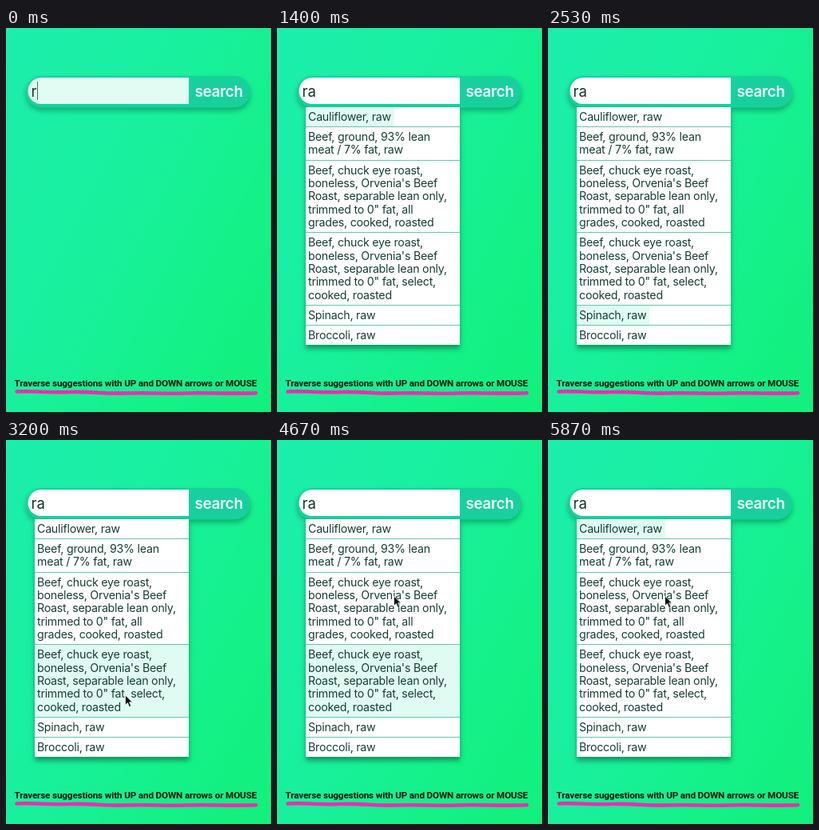
These frames come from a looping animation (332 px wide and 480 px high, 5940 ms). An HTML page:

```html
<!DOCTYPE html>
<html lang="en">
<head>
<meta charset="utf-8">
<title>Search suggestions</title>
<style>
  html, body { margin: 0; width: 100%; height: 100%; overflow: hidden; }
  #stage {
    position: relative; width: 332px; height: 480px; overflow: hidden;
    background: linear-gradient(117deg, #1ceead 0%, #18f09c 45%, #14f187 75%, #12f07c 100%);
    font-family: Inter, "Liberation Sans", sans-serif;
  }
  svg { position: absolute; left: 0; top: 0; }
  #list {
    position: absolute; left: 35.5px; top: 98.6px; width: 193.5px;
    background: #fff; color: #153f36;
    font-size: 14.2px; line-height: 16.35px; letter-spacing: -.23px;
    box-shadow: 0 5px 6px rgba(0, 85, 55, .55);
  }
  .item { border-bottom: 1px solid #62c9ab; white-space: pre; }
  .item:last-child { border-bottom: 0; margin-bottom: -1px; }
  .item span { display: block; padding: 4px 4px 4px 3.5px; }
  .item .short { width: fit-content; }
  .item .on { background: #e0fbf2; }
  .bar { filter: drop-shadow(0 4px 3px rgba(0, 100, 65, .45)); }
  .caption { font: 700 11.7px Roboto, "Noto Sans", sans-serif; letter-spacing: -.14px; }
</style>
</head>
<body>
<div id="stage">
  <svg width="332" height="480" viewBox="0 0 332 480">
    <rect class="bar" x="25" y="60" width="281" height="39.5" rx="19.5" fill="#18d09e"/>
    <path id="field" d="M229 62H44a16.5 16.5 0 0 0 0 33H229Z"/>
    <text id="query" x="31.5" y="86" font-size="18.5" fill="#10352d"></text>
    <rect id="caret" y="67" width="1" height="23" fill="#426f66"/>
    <text x="236.5" y="85.5" font-size="19" font-weight="600" letter-spacing="-.4" fill="#effff9">search</text>
    <path d="M13.5 454.5C35 453.5 55 456 80 455S125 457.5 150 456.5S200 457.5 225 456.5S285 457.5 313 456.2"
      fill="none" stroke="#ee2cb2" stroke-width="4.6" stroke-linecap="round"/>
    <text class="caption" x="10.5" y="448" fill="#07140f">Traverse suggestions with UP and DOWN arrows or MOUSE</text>
  </svg>
  <div id="list"></div>
  <svg width="332" height="480" viewBox="0 0 332 480">
    <path id="pointer" d="M0 0V12.2L2.9 9.6L5 14.6L7.2 13.6L5.1 8.8H8.8Z"
      fill="#0b0f0e" stroke="#e8f5f0" stroke-width=".8" stroke-linejoin="round"/>
  </svg>
</div>
<script>
const LOOP = 5940;
const TYPED = 330, FIRST_KEY = 1130, POINTER_IN = 2750;

const roast = ["Beef, chuck eye roast,", "boneless, Orvenia's Beef", "Roast, separable lean only,"];
const entries = [
  ["Cauliflower, raw"],
  ["Beef, ground, 93% lean", "meat / 7% fat, raw"],
  [...roast, "trimmed to 0\" fat, all", "grades, cooked, roasted"],
  [...roast, "trimmed to 0\" fat, select,", "cooked, roasted"],
  ["Spinach, raw"],
  ["Broccoli, raw"]
];

// [time, highlighted row]
const picks = [
  [0, -1], [FIRST_KEY, 0], [1600, 1], [1870, 2], [2140, 3], [2400, 4],
  [3000, 3], [3740, 2], [4400, 3], [4930, 4], [5270, 5], [5600, 0]
];

// [time, x, y]
const path = [
  [POINTER_IN, 212, 352], [3130, 149.5, 319], [3450, 149.5, 319], [3980, 146.5, 195]
];

const $ = id => document.getElementById(id);
const list = $("list"), field = $("field"), query = $("query");
const caret = $("caret"), pointer = $("pointer");

const rows = entries.map(lines => {
  const item = document.createElement("div");
  const label = document.createElement("span");
  item.className = "item";
  label.textContent = lines.join("\n");
  label.classList.toggle("short", lines.length === 1);
  item.append(label);
  list.append(item);
  return label;
});

const current = (steps, t) => steps.filter(s => s[0] <= t).pop();
const ease = p => p * p * (3 - 2 * p);

function pointerAt(t) {
  const from = current(path, t) || path[0];
  const to = path[path.indexOf(from) + 1] || from;
  const p = to === from ? 0 : ease((t - from[0]) / (to[0] - from[0]));
  return [1, 2].map(i => from[i] + (to[i] - from[i]) * p);
}

function draw(t) {
  const typed = t >= TYPED;
  const focused = t < FIRST_KEY;
  const pick = current(picks, t)[1];

  query.textContent = typed ? "ra" : "r";
  field.setAttribute("fill", focused ? "#e2fcf3" : "#fff");
  caret.setAttribute("x", typed ? 49.5 : 39);
  caret.style.display = focused ? "" : "none";
  list.style.display = typed ? "" : "none";
  rows.forEach((row, i) => row.classList.toggle("on", i === pick));

  pointer.style.display = t >= POINTER_IN ? "" : "none";
  pointer.setAttribute("transform", `translate(${pointerAt(t)})`);
}

const start = performance.now();
function tick() {
  draw((performance.now() - start) % LOOP);
  requestAnimationFrame(tick);
}
tick();
</script>
</body>
</html>
```
